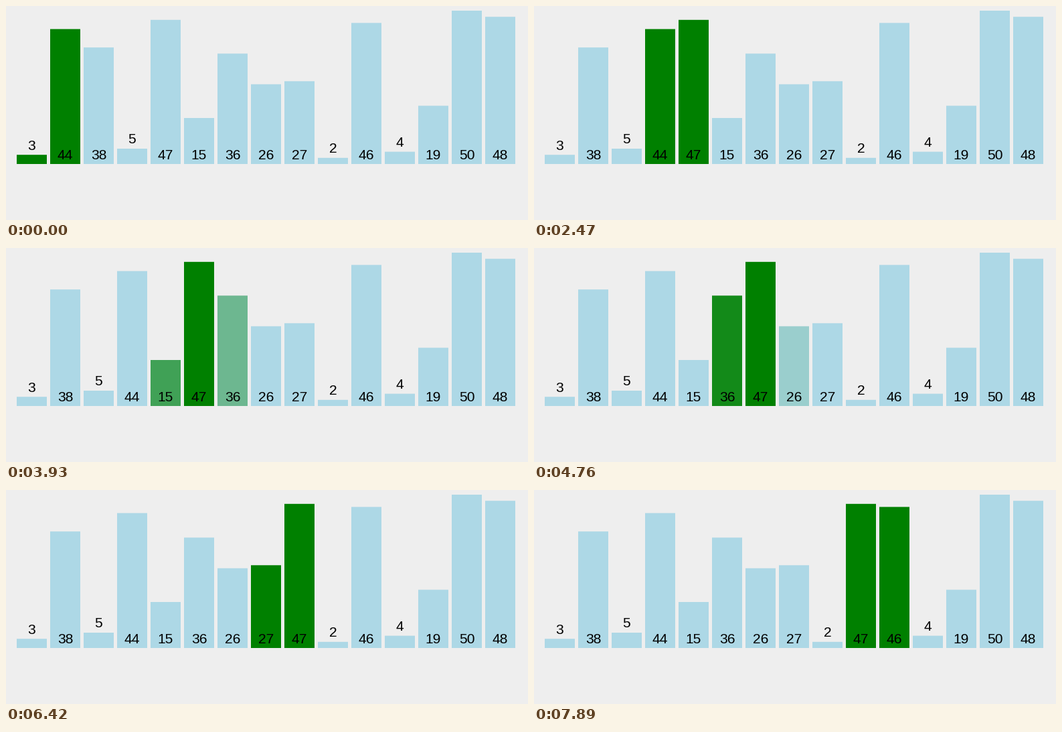
Write a matplotlib script that moves like this. It is 780 px wide and 321 px high and loops after 8 s.

```python
import matplotlib.pyplot as plt
import numpy as np
from matplotlib.animation import FuncAnimation
from matplotlib.colors import to_rgb
from matplotlib.patches import Rectangle

WIDTH, HEIGHT, DPI = 780, 321, 100
LOOP_MS, STEP_MS = 8000, 20
BASE, LEFT, PITCH, BAR_WIDTH, UNIT = 237, 16, 50, 45, 4.6
IDLE, ACTIVE = np.array(to_rgb("lightblue")), np.array(to_rgb("green"))

VALUES = [3, 44, 38, 5, 47, 15, 36, 26, 27, 2, 46, 4, 19, 50, 48]

# All times in ms.
FIRST_FADE, FADE_MS = 313, 150
SWAP_DELAY, SWAP_MS = 431, 280
PASS_MS, PASS_WITH_SWAP_MS = 515, 972
TICK_START, TICK_MS = 422, 135.6


def ease(t):
    """Cubic ease in and out, clamped to 0..1."""
    t = min(max(t, 0), 1)
    return 4 * t**3 if t < 0.5 else 1 - 4 * (1 - t)**3


def hold(ms):
    """The screen refreshes only on slow, regular ticks."""
    return TICK_START + (ms - TICK_START) // TICK_MS * TICK_MS


def state(ms):
    """Bubble sort at a given time: slot and highlight of every value."""
    order = list(VALUES)
    slot = {v: float(i) for i, v in enumerate(order)}
    glow = dict.fromkeys(order, 0.0)
    glow[order[0]] = glow[order[1]] = 1.0
    start = FIRST_FADE
    for i in range(1, len(order) - 1):
        if ms <= start:
            break
        before, left, right = order[i - 1:i + 2]
        shown = ease((ms - start) / FADE_MS)
        glow[before], glow[left], glow[right] = 1 - shown, 1.0, shown
        if left > right:
            moved = ease((ms - start - SWAP_DELAY) / SWAP_MS)
            slot[left], slot[right] = i + moved, i + 1 - moved
            order[i], order[i + 1] = right, left
            start += PASS_WITH_SWAP_MS
        else:
            start += PASS_MS
    return slot, glow


fig = plt.figure(figsize=(WIDTH / DPI, HEIGHT / DPI), dpi=DPI, facecolor="#eeeeee")
ax = fig.add_axes([0, 0, 1, 1])
ax.set_xlim(0, WIDTH)
ax.set_ylim(HEIGHT, 0)
ax.axis("off")

bars, labels = {}, {}
for v in VALUES:
    top = BASE - v * UNIT
    bars[v] = ax.add_patch(
        Rectangle((0, top), BAR_WIDTH, v * UNIT, linewidth=0, snap=False))
    labels[v] = ax.text(0, (top if v < 10 else BASE) - 7.5, str(v), ha="center",
                        va="baseline", color="black", family="Liberation Sans",
                        fontsize=21 * 72 / DPI, zorder=3)


def update(frame):
    slot, glow = state(hold((frame + 0.5) * STEP_MS))
    for v in VALUES:
        x = LEFT + PITCH * slot[v]
        bars[v].set_x(x)
        bars[v].set_facecolor(IDLE + (ACTIVE - IDLE) * glow[v])
        labels[v].set_x(x + BAR_WIDTH / 2)
    return [*bars.values(), *labels.values()]


anim = FuncAnimation(fig, update, frames=LOOP_MS // STEP_MS, interval=STEP_MS,
                     repeat=True, repeat_delay=0)
plt.show()
```
